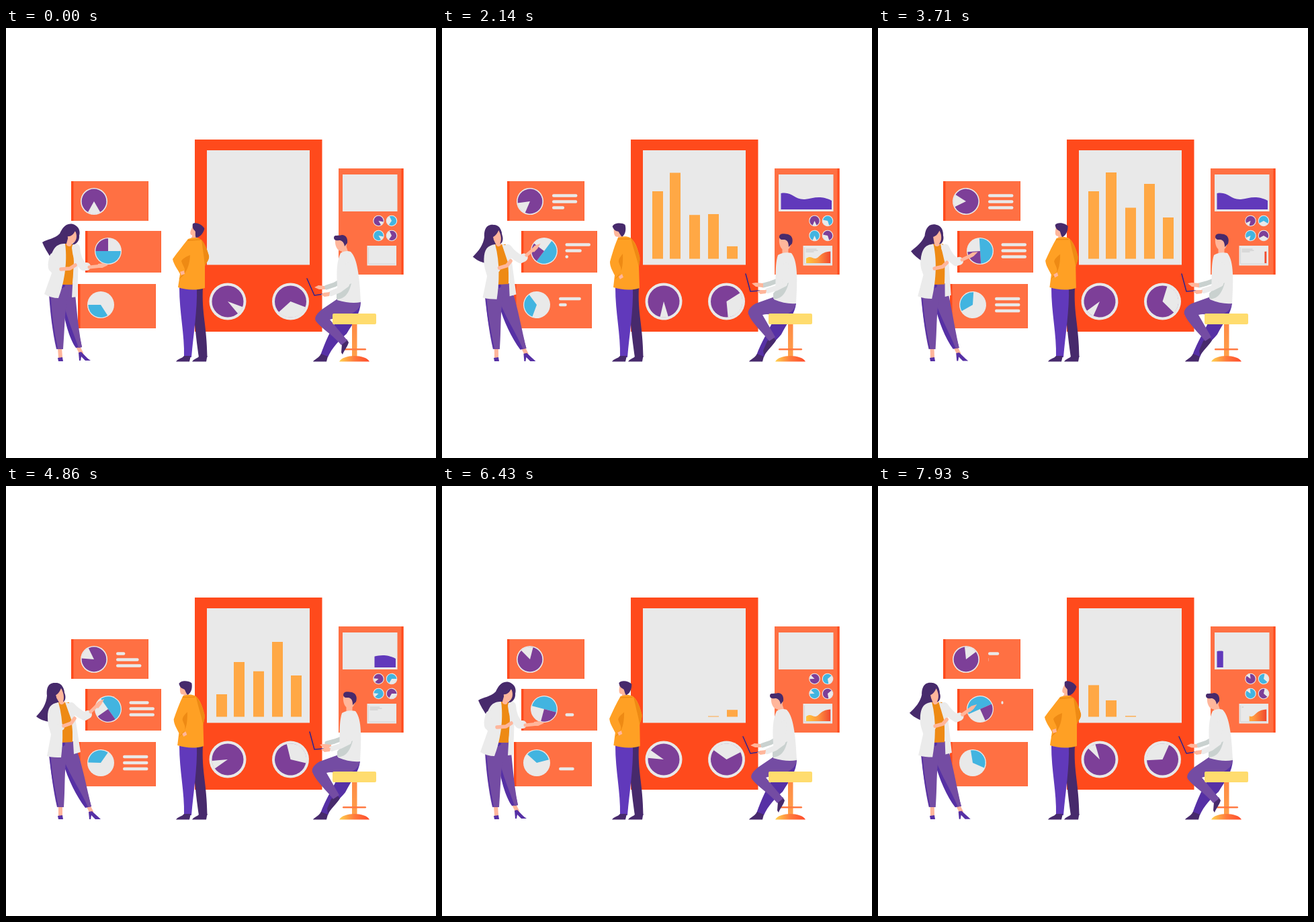
Write an HTML page with a canvas that moves like this. It is 640 px wide and 640 px high and loops after 8 s.

```html
<!DOCTYPE html>
<html lang="en">
<head>
<meta charset="utf-8">
<title>Dashboard team</title>
<style>
  html, body { margin: 0; width: 100%; height: 100%; overflow: hidden; background: #fff; }
  canvas { display: block; width: 100vw; height: 100vh; }
</style>
</head>
<body>
<canvas id="stage" width="640" height="640"></canvas>
<script>
const ctx = document.getElementById('stage').getContext('2d');
const RED = '#ff4a1c', CORAL = '#ff7043', LIGHT = '#e9e9e9', BAR = '#ffa845';
const PLUM = '#7d3f98', SKY = '#42b4e0', SKIN = '#ffb69b', HAIR = '#472a6c';
const VIOLET = '#744ca3', INDIGO = '#5630a5', BLUE = '#6139bb', ORANGE = '#ffa024', AMBER = '#ee8a14';
const CLOTH = '#ebebeb', SHADE = '#c9d1cf', NAVY = '#35268c';

// ---- helpers ----
const lerp = (a, b, k) => a + (b - a) * k;
function ease(p, start, duration) {
  const u = Math.min(1, Math.max(0, (p - start) / duration));
  return u * u * (3 - 2 * u);
}
const pulse = (p, inAt, inFor, outAt, outFor) => ease(p, inAt, inFor) - ease(p, outAt, outFor);
function track(p, keys) {
  let value = keys[0][1];
  for (let i = 1; i < keys.length; i++) {
    const [t0, v0] = keys[i - 1], [t1, v1] = keys[i];
    if (p >= t0) value = lerp(v0, v1, ease(p, t0, t1 - t0));
  }
  return value;
}
function rect(color, x, y, w, h, radius = 0) {
  ctx.fillStyle = color;
  ctx.beginPath();
  ctx.roundRect(x, y, w, h, radius);
  ctx.fill();
}
function fill(color, path) {
  ctx.fillStyle = color;
  ctx.fill(new Path2D(path));
}
function stroke(color, width, path) {
  ctx.strokeStyle = color;
  ctx.lineWidth = width;
  ctx.lineCap = ctx.lineJoin = 'round';
  ctx.stroke(new Path2D(path));
}
// Blend two paths that share the same commands.
function blend(a, b, k) {
  const number = /-?\d+(\.\d+)?/g, ends = b.match(number);
  let i = 0;
  return a.replace(number, n => lerp(+n, +ends[i++], k).toFixed(2));
}
function gradient(x0, y0, x1, y1, ...colors) {
  const g = ctx.createLinearGradient(x0, y0, x1, y1);
  colors.forEach((c, i) => g.addColorStop(i / (colors.length - 1), c));
  return g;
}
function clipped(x, y, w, h, draw) {
  ctx.save();
  ctx.beginPath();
  ctx.rect(x, y, w, h);
  ctx.clip();
  draw();
  ctx.restore();
}
function pie(x, y, ring, r, turn, base, ...wedges) {
  const disc = (color, radius, from = 0, size = 360) => {
    const a = (from + turn) * Math.PI / 180;
    ctx.fillStyle = color;
    ctx.beginPath();
    if (size < 360) ctx.moveTo(x, y);
    ctx.arc(x, y, radius, a, a + size * Math.PI / 180);
    ctx.fill();
  };
  disc(LIGHT, ring);
  disc(base, r);
  for (const [color, from, size] of wedges) disc(color, r + 0.3, from, size);
}

// ---- boards ----
const cards = [
  { box: [97, 228, 115, 59], text: [164, 249.5],
    lines: [[.355, 1.26, 4.08, 1.3], [.855, 1.28, 4.6, 1.3], [1.26, 1.66, 4.95, 1.3]] },
  { box: [118, 302, 113, 62], text: [183.5, 322.5],
    lines: [[.72, 1.22, 4.46, 1.3], [1.22, 1.42, 5, 1.3], [1.79, 1.3, 5.64, 1.3]] },
  { box: [107, 381, 116, 66], text: [174, 403],
    lines: [[.9, 1.5, 4.86, 1.3], [1.55, 1.4, 5.1, 1.3], [2.1, 1.4, 6, 1]] }
];

function drawCards(p, turn) {
  for (const { box: [x, y, w, h], text: [tx, ty], lines } of cards) {
    rect(CORAL, x, y, w, h);
    rect(RED, x, y, 3.5, h);
    rect('#ff6030', x + w - 1, y, 1, h);
    lines.forEach((times, i) => {
      const length = 37.5 * pulse(p, ...times);
      if (length > .05) rect(LIGHT, tx, ty + 9 * i - 2.2, length, 4.4, Math.min(2.2, length / 2));
    });
  }
  pie(131, 258, 20, 18.4, turn, PLUM, [LIGHT, 60, 59]);
  pie(152, 332, 20, 18.4, -turn, LIGHT, [SKY, 0, 180], [PLUM, 180, 90]);
  pie(141, 412, 20, 18.4, turn, LIGHT, [SKY, 57, 123]);
}

function drawBigBoard(p, turn) {
  rect(RED, 281, 166, 189.5, 286);
  rect(LIGHT, 299, 182, 153, 170.5);
  [[313, 100.5], [339, 128.5], [368, 76], [396, 111.5], [424, 61.5]].forEach(([x, full], i) => {
    const h = full * pulse(p, .13 + i / 3, 1.667, 3.835 + i * .34, 1.667);
    rect(BAR, x, 343.5 - h, 16, h);
  });
  pie(330, 407, 27.5, 23.5, turn, PLUM, [LIGHT, 20, 30]);
  pie(423.5, 407, 27.5, 23.5, -turn, PLUM, [LIGHT, 21, 117]);
}

function drawSideBoard(p, turn) {
  rect(CORAL, 495, 209, 96.5, 158);
  rect(RED, 588.5, 209, 3, 158);
  rect(LIGHT, 501, 218, 81.5, 55);
  const from = 76 * ease(p, 4.3, 1), to = 76 * ease(p, .7, 1.02);
  clipped(504 + from, 240, to - from, 31, () =>
    fill(BLUE, 'M504.500 270V246C522 243 524 256 540 255C552 254 562 248 580 257V270Z'));

  pie(554.5, 287, 8.3, 7.2, turn, PLUM, [LIGHT, 12, 48]);
  pie(574, 287, 8.3, 7.2, -turn, SKY, [LIGHT, 125, 120]);
  pie(554.5, 309, 8.3, 7.2, turn, SKY, [LIGHT, 12, 48]);
  pie(574, 309, 8.3, 7.2, -turn, PLUM, [LIGHT, 125, 120]);

  rect(LIGHT, 537.5, 324, 43.5, 29.5);
  stroke('#cfcfcf', .8, 'M539.500 327V351H579');
  [16, 18, 12].forEach((w, i) =>
    rect('#b9b9b9', 541.5, 328.7 + 2 * i, w * pulse(p, .8 + i * .1, .5, 4.7 + i * .2, .9), .7));
  const shown = pulse(p, .35, .9, 2.7, 1.15) + pulse(p, 5.2, 1, 6.45, .5);
  clipped(578.5 - 36.5 * shown, 325, 36.5 * shown, 27, () =>
    fill(gradient(542, 0, 578, 0, '#ffc93c', '#ff9540', '#f0482f'),
      'M542 350V343C550 337 553 347 560 341C566 335 570 333 578.500 332.500V350Z'));
}

// ---- people ----
function drawWoman(p) {
  const k = track(p, [[0, 0], [1.333, 1], [3.667, .55], [4.86, 1], [5, 1], [6.4, 0]]);
  const part = (color, a, b) => fill(color, blend(a, b, k));
  const limb = (color, width, a, b) => stroke(color, width, blend(a, b, k));

  part(HAIR, 'M100 292C88 289 83 300 80 306C72 314 62 314 54 319C57 327 62 334 66 341C74 330 84 326 92 320L106 318C110 308 110 296 100 292Z',
             'M74 293C62 292 60 302 61 312C60 324 54 334 45 343C51 348 58 350 64 351C64 338 70 330 78 324L86 318C89 306 86 295 74 293Z');
  limb(SKIN, 6, 'M80 476L81 490', 'M81 476L81 490');
  limb(SKIN, 6, 'M107 474L112 484', 'M122 475L127 485');
  part(INDIGO, 'M77 491L84 490L85 496L78 496Z', 'M77 491L84 490L85 496L78 496Z');
  part(INDIGO, 'M108 483L112 482C117 487 121 492 126 495L118 495L112 489L111 495L109 495Z',
               'M123 485L128 484C132 488 137 492 141 496L133 496L127 490L126 496L124 496Z');
  part(INDIGO, 'M82 380L100 380C102 410 105 440 113 475L104 476C94 462 87 435 84 412Z',
               'M83 380L99 380C107 402 117 440 127 477L118 479C105 462 92 436 85 412Z');
  part(VIOLET, 'M88 380L101 380C105 408 106 440 113 475L108 476C101 455 90 430 86 410Z',
               'M88 380L100 380C111 402 118 440 127 477L122 478C112 455 95 430 87 410Z');
  part(VIOLET, 'M66 396L96 381C87 410 88 440 85 478L75 478C69 452 66 424 64 398Z',
               'M66 398L96 381C85 410 89 440 86 478L76 478C70 452 67 424 64 402Z');
  limb(INDIGO, 1.6, 'M66 402C67 426 71 452 76 476', 'M66 404C67 426 72 452 77 476');
  part(AMBER, 'M86 321L101 321C103 342 101 362 99 382L83 382C88 360 91 340 86 321Z',
              'M76 322L94 322C98 342 100 362 99 381L82 382C85 360 82 340 76 322Z');
  limb(CLOTH, 12, 'M104 327C105 340 110 350 115 355L120 355', 'M97 328C104 336 111 340 117 343L122 340');
  limb(SKIN, 5, 'M124 356L143 354', 'M126 336L137 325');
  part(SKIN, 'M137 351L145 350L152 353L143 357L136 357Z', 'M132 328L137 321L146 317L142 325L137 331Z');
  part(CLOTH, 'M99 321C105 323 108 330 108 340L106 400L98 401L101 348Z',
              'M88 322C95 322 99 328 102 338L111 396L101 399L98 350Z');
  part(CLOTH, 'M88 321C76 321 71 326 66 342C62 354 66 360 68 365L57 396C64 400 71 402 78 402C86 382 92 350 88 321Z',
              'M78 322C66 324 62 330 62 344C62 358 66 364 67 370L61 402C68 404 75 404 82 404C85 380 86 350 78 322Z');
  limb(CLOTH, 10, 'M70 340C67 350 67 358 70 359L78 359', 'M70 342C68 352 70 360 75 361L82 359');
  limb(SKIN, 5.5, 'M82 359L95 358L103 353', 'M86 357L97 353L102 346');
  limb(SKIN, 8, 'M96 314L94 321', 'M79 314L83 321');
  part(SKIN, 'M94 302C99 299 105 302 106 308C106 316 104 321 99 320C93 319 89 310 94 302Z',
             'M76 302C81 298 85 300 87 307C89 315 87 320 82 319C75 317 71 309 76 302Z');
  part(HAIR, 'M90 310C88 299 93 292 100 293C108 294 111 302 109 309C110 316 104 324 98 322C105 318 107 310 103 302C100 308 96 311 90 310Z',
             'M70 313C65 301 69 293 76 293C84 294 86 302 87 308C90 314 88 321 85 321C87 315 86 308 82 301C80 306 77 311 70 313Z');
}

function drawManager(p) {
  const k = track(p, [[0, 0], [.93, 0], [1.62, .78], [2.14, 1], [3.71, .57], [4.86, .83], [6.3, .65], [6.95, 0]]);
  const part = (color, a, b) => fill(color, blend(a, b, k));

  fill(HAIR, 'M278 386L293 386C291 425 299 442 299.500 490L287 490C283 462 279 430 278 386Z');
  fill(BLUE, 'M258 386L284 386C285 420 279 455 276 490L265 490C266 455 258 425 258 386Z');
  fill(HAIR, 'M265 488L275 488L273 496.500L253 496.500C256 492 262 492 265 488Z');
  fill(HAIR, 'M288 488L299.500 488L298 496.500L277 496.500C280 492 285 492 288 488Z');

  ctx.save();
  ctx.translate(lerp(280, 266, k), 313);
  ctx.rotate(lerp(22, -8, k) * Math.PI / 180);
  fill(SKIN, 'M-8 -18L4 -18L4 2L-4 2L-4 -3C-9 -2 -10 -8 -8 -18Z');
  fill(HAIR, 'M-10 -19C-8 -24 4 -24 9 -19C10 -11 7 -4 2 -2C0 -4 -1 -8 -2 -10C-4 -12 -8 -11 -10 -19Z');
  ctx.restore();

  part(ORANGE, 'M271 314C277 312 283 311 289 314C295 318 299 329 302 339C303 345 298 349 296 354L296 387C282 391 268 390 256 386L259 366C255 358 250 353 248 344C255 334 264 323 271 314Z',
               'M262 312C268 310 274 309 280 312C288 318 291 328 294 340C295 347 293 351 293 356L294 387C282 391 268 390 255 386L257 368C253 360 250 355 250 348C253 337 257 323 262 312Z');
  part(AMBER, 'M291 315C297 322 300 332 302 339C303 345 298 349 296 354C295 342 293 330 291 315Z',
              'M281 313C288 320 291 330 294 340C295 347 293 351 293 356C290 342 285 330 281 313Z');
  part(AMBER, 'M274 338C267 341 263 343 261 347C263 354 267 357 266 362L257 374C266 368 273 358 274 338Z',
              'M269 336C265 341 263 344 263 348C265 355 268 358 266 364L257 374C266 369 270 358 269 336Z');
  part(SKIN, 'M259 363L265 361L266 366L261 368Z', 'M263 370L268 366L270 371L265 374Z');
  stroke(AMBER, 1.4, blend('M271 316L289 315', 'M262 314L279 314', k));
}

function drawCoder(p) {
  const k = pulse(p, 1.35, .75, 4.95, .9);
  const reach = pulse(p, .85, .4, 1.42, .5) + pulse(p, 4.3, .5, 4.9, .5);
  const part = (color, a, b) => fill(color, blend(a, b, k));
  const limb = (color, width, a, b) => stroke(color, width, blend(a, b, k));

  // far leg and stool
  part(INDIGO, 'M528 407C528 425 516 440 507 455C496 465 485 476 479 490L468 487C476 466 482 450 496 430Z',
               'M527 409C526 425 514 438 505 456C497 466 484 476 479 490L468 487C476 466 486 450 496 430Z');
  fill(HAIR, 'M469 485L479 489L477 496.500L457 496.500C459 493 465 492 469 485Z');
  rect(gradient(0, 440, 0, 490, '#ff8a45', '#ffa04a'), 515, 440, 7.5, 50);
  rect('#ff7a42', 501, 477, 35, 2.6, 1.3);
  fill(gradient(496, 0, 541, 0, '#ffd34e', '#ff7a3c', '#ff4a2a'), 'M496 496.500C502 485 535 485 541 496.500Z');

  // near leg
  part(HAIR, 'M500 470L507 463L510 468C508 475 503 480 501 486L499 483Z',
             'M484 466L492 459L497 465C493 472 483 481 479 488L478 480Z');
  part(VIOLET, 'M528 406C528 420 516 425 505 429C496 432 488 432 482 434L508 465L499 472C488 458 470 448 461 436C458 430 464 424 470 419L495 402Z',
               'M527 408C526 422 514 427 503 428C493 428 485 424 477 427L496 460L487 466C476 452 462 440 456 426C454 420 460 414 467 410L495 400Z');
  rect('#ffdc6e', 486, 425, 65, 16, 2);

  // far arm and laptop
  const dx = 6 * reach, dy = 5 * reach;
  limb(SHADE, 7, 'M498 377L489 382L477 386', 'M500 376L489 380L478 383');
  ctx.save();
  ctx.translate(dx, dy);
  part(SKIN, 'M474 384L465 383L459 386L466 389L475 389Z', 'M478 380L467 379L461 380L467 385L478 386Z');
  ctx.restore();
  limb(NAVY, 1.6, 'M448 373L459 398L472 396', 'M452 366L459 392L473 391');

  // body, near arm, head
  limb(SKIN, 9, 'M502 326L505 335', 'M511 325L511 337');
  part(CLOTH, 'M498 335C503 332 508 331 513 333C521 341 526 360 528 408C518 410 507 409 493 405C495 385 488 356 498 335Z',
              'M500 338C505 335 512 333 520 335C528 345 530 365 527 410C517 411 506 409 494 404C499 385 494 356 500 338Z');
  part(SHADE, 'M514 380C505 385 498 390 492 396L492 404C500 403 509 401 514 380Z',
              'M516 379C507 385 499 388 493 395L493 403C501 404 511 400 516 379Z');
  limb(CLOTH, 8, 'M509 352L507 382L496 390L484 395', 'M512 352L510 381L498 387L485 391');
  part(SKIN, 'M482 393L473 394L469 397L474 400L481 399Z', 'M483 390L474 390L469 392L474 396L482 395Z');
  part(SKIN, 'M490 315L506 315C509 323 506 330 500 332C494 333 489 325 490 315Z',
             'M502 313L519 314C521 323 517 331 511 331C505 331 501 323 502 313Z');
  part(HAIR, 'M488 312C488 307 495 310 500 308C506 308 509 313 508 320L504 325C503 318 499 316 496 316C492 317 488 316 488 312Z',
             'M502 311C503 304 510 307 515 307C521 309 523 314 521 321L516 326C516 319 514 316 510 315C507 315 503 316 502 311Z');
}

function frame(now) {
  const t = Math.floor(now % 8000 * 14 / 1000 + 1e-6) / 14;  // 14 steps a second
  const p = t % 7, turn = t * 360 / 14;
  ctx.fillStyle = '#fff';
  ctx.fillRect(0, 0, 640, 640);
  drawCards(p, turn);
  drawBigBoard(p, turn);
  drawSideBoard(p, turn);
  drawWoman(p);
  drawManager(p);
  drawCoder(p);
}

const begin = performance.now();
(function loop() {
  frame(performance.now() - begin);
  requestAnimationFrame(loop);
})();
</script>
</body>
</html>
```
